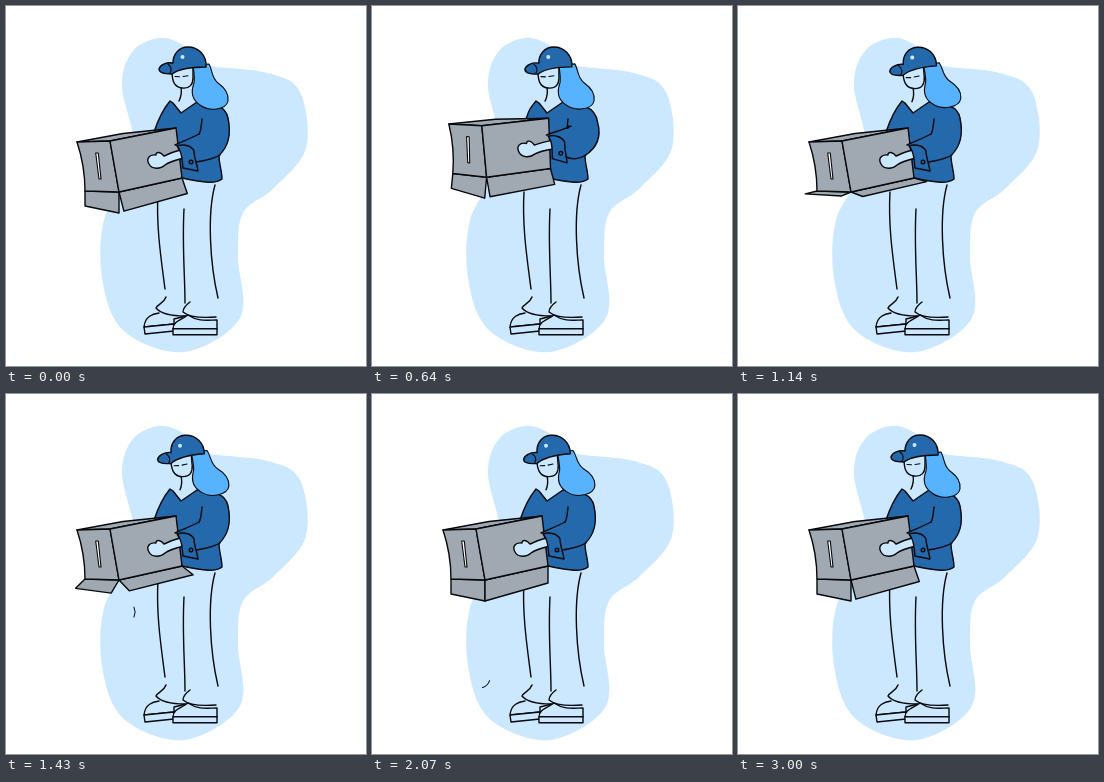
An HTML page with a canvas that plays this animation: 360 px wide and 360 px high, repeating every 3.07 s.

```html
<!DOCTYPE html>
<html lang="en">
<head>
<meta charset="utf-8">
<title>Woman holding a box</title>
<style>
html, body { margin: 0; width: 100%; height: 100%; overflow: hidden; background: #fff; }
canvas { display: block; width: 360px; height: 360px; }
</style>
</head>
<body>
<canvas id="stage"></canvas>
<script>
const LOOP = 3070;
const INK = '#05080c', PALE = '#cce8ff', NAVY = '#2369ac', HAIR = '#58b3ff', CARD = '#a0a8b1';
const canvas = document.getElementById('stage');
const dpr = window.devicePixelRatio || 1;
canvas.width = canvas.height = 360 * dpr;
const ctx = canvas.getContext('2d');
const { sin, cos, PI } = Math;

// Progress from 0 to 1 between two times, eased at both ends.
function ease(t, from, to) {
  const u = Math.min(1, Math.max(0, (t - from) / (to - from)));
  return u * u * (3 - 2 * u);
}

// Rises from 0 to 1 and falls back between two times.
const bump = (t, from, to) => t < from || t > to ? 0 : sin(PI * (t - from) / (to - from)) ** 2;

function shape(d, fill, stroke = INK, width = 1.4) {
  const p = new Path2D(d);
  if (fill) { ctx.fillStyle = fill; ctx.fill(p); }
  if (stroke) { ctx.strokeStyle = stroke; ctx.lineWidth = width; ctx.stroke(p); }
}

const poly = (...pts) => 'M' + pts.map(p => p.join(' ')).join('L') + 'Z';

function dot(x, y, r) {
  ctx.beginPath();
  ctx.arc(x, y, r, 0, 2 * PI);
}

// Draws with everything turned about a pivot and then shifted.
function turned(x, y, angle, dx, dy, paint) {
  ctx.save();
  ctx.translate(x + dx, y + dy);
  ctx.rotate(angle);
  ctx.translate(-x, -y);
  paint();
  ctx.restore();
}

// Closed Catmull-Rom curve.
function closedCurve(pts) {
  const n = pts.length, at = i => pts[(i + n) % n];
  let d = 'M' + pts[0].join(' ');
  for (let i = 0; i < n; i++) {
    const a = at(i - 1), b = at(i), c = at(i + 1), e = at(i + 2);
    d += `C${b[0] + (c[0] - a[0]) / 6} ${b[1] + (c[1] - a[1]) / 6} `
      + `${c[0] - (e[0] - b[0]) / 6} ${c[1] - (e[1] - b[1]) / 6} ${c[0]} ${c[1]}`;
  }
  return d + 'Z';
}

const BLOB = closedCurve([[153, 32], [177, 39], [196, 58], [262, 67], [294, 86], [300, 142], [268, 182],
  [237, 207], [232, 250], [234, 312], [178, 346], [119, 326], [97, 278], [98, 214], [129, 152], [116, 80], [127, 45]]);

function legs() {
  shape('M152 186C150 220 155 252 159 283');
  shape('M178 203C176 240 179 270 179 297');
  shape('M209 179C201 208 204 258 212 292');
  shape('M153 307C147 308 139 310 138 321L168 318V313L180 310', PALE);
  shape('M138 321L168 318V325L139 328Z', PALE);
  shape('M182 309C176 314 167 315 167 323H211V314C202 314 192 316 182 309Z', PALE);
  shape('M167 322.7H211V328.7H167Z', PALE);
  shape('M160 291C158 297 152 298 150 302C155 308 165 310 179 310');
  shape('M184 296C180 299 177 302 177 306C184 312 197 312 210 311');
}

function torso(k) {
  const x = 148 + 8 * k, y = 126 - 17 * k, arm = 222 + 5 * k;
  shape(`M${x} ${y}C${x + 4} ${y - 12} 159 101 164 95L167 97L175 107L191 96C207 97 ${arm - 2} 100 ${arm} ${112 + 6 * k}`
    + `C${arm + 4} 131 ${arm - 1} 142 213 149.5C213 158 216 165 216 173C210 178 199 177 176 172L160 150Z`, NAVY);
}

function head() {
  shape('M175 81C176 87 175 91 173 95');
  shape('M187 59L203 58C207 65 205 71 212 77C219 82 223 88 222 95C220 104 203 106 194 99C185 93 185 85 188 77C189 72 188 66 187 59Z', HAIR, INK, 1.1);
  shape('M166 64C166 73 167 81 176 82C184 83 187 78 187 72V60Z', PALE);
  shape('M169 70.5L173.5 70.8M177 70.5L182 69.8', null, INK, 1.1);
  shape('M167 57C160 56 154 59 153 63C153 67 160 68 166 68C174 62 187 61 200 61C201 49 192 41 182 41C173 41 167 48 167 57Z', NAVY);
  shape('M162 58Q167 62 164 67', null, INK, 1.1);
  ctx.fillStyle = PALE;
  dot(176.5, 51, 2);
  ctx.fill();
}

function box(left, right) {
  const hang = (p, angle, w, h) => [p[0] + w * sin(angle), p[1] + h * cos(angle)];
  const a = [71, 136], b = [104, 135], c = [170, 122], back = [117, 127.5];
  const d = [79, 185], e = [113, 186], f = [176, 172];
  shape(poly(d, e, hang(e, left, -10, 21), hang(d, left, -12, 15)), CARD);
  shape(poly(e, f, hang(f, right, 13, 17), hang(e, right, 12, 21)), CARD);
  shape(poly(a, back, c, b), CARD);
  shape(`M${a}L${b}L${e}L${d}Q79 160 ${a}Z`, CARD);
  shape(poly(b, c, f, e), CARD);
  shape('M89.7 147H92.3L95 173H93Z', '#fff', INK, 1.1);
}

function forearm() {
  shape('M176 144C168 145 163 148 158 150C155 146 150 145 150 149C143 148 140 153 143 158C146 164 155 163 159 159C163 156 170 154 178 152', PALE);
  shape('M194 128C184 133 177 135 169 139L192 156L206 152V130Z', NAVY, null);
  shape('M193 128C184 133 177 135 169 139');
  shape('M171 140C177 146 176 156 177 162L192 165C191 158 188 151 188 145C185 139 177 138 171 140Z', NAVY);
  dot(185, 156, 1.8);
  ctx.stroke();
}

// Thin curl drifting down from the open box.
function curl(t) {
  if (t < 1170 || t > 2350) return;
  const u = (t - 1430) / 640, swing = cos(u * PI);
  ctx.save();
  ctx.globalAlpha = Math.min(1, (2350 - t) / 150);
  ctx.translate(121 + 7 * swing, 218 + 72 * u);
  ctx.rotate(.4 * (1 - swing));
  shape('M0 -5Q2.5 0 0 5', null, INK, 1);
  ctx.restore();
}

function draw(now) {
  const t = now % LOOP;
  const lift = bump(t, 0, 950), swing = bump(t, 600, 1780);
  const settle = ease(t, 2070, 3000);
  const ajar = 1 - ease(t, 1430, 2070) + settle;
  const tilt = .08 * (ease(t, 500, 1300) - settle);

  ctx.setTransform(dpr, 0, 0, dpr, 0, 0);
  ctx.lineJoin = ctx.lineCap = 'round';
  ctx.fillStyle = '#fff';
  ctx.fillRect(0, 0, 360, 360);
  shape(BLOB, PALE, null);
  legs();
  torso(lift);
  turned(184, 82, -tilt, 0, 0, head);
  curl(t);
  // The box carries the hand and cuff with it.
  turned(104, 135, .113 * lift, 8 * lift, -21 * lift, () => {
    box(1.4 * swing, .42 * ajar + .95 * swing);
    forearm();
  });
  const k = lift;
  shape(`M196 113C195 122 195 125 ${193 + 5 * k} ${128 - 11 * k}M${191 + 4 * k} ${156 - 7 * k}C200 154 208 153 214 149`);
}

const start = performance.now();
function tick() {
  draw(performance.now() - start);
  requestAnimationFrame(tick);
}
tick();
</script>
</body>
</html>
```
